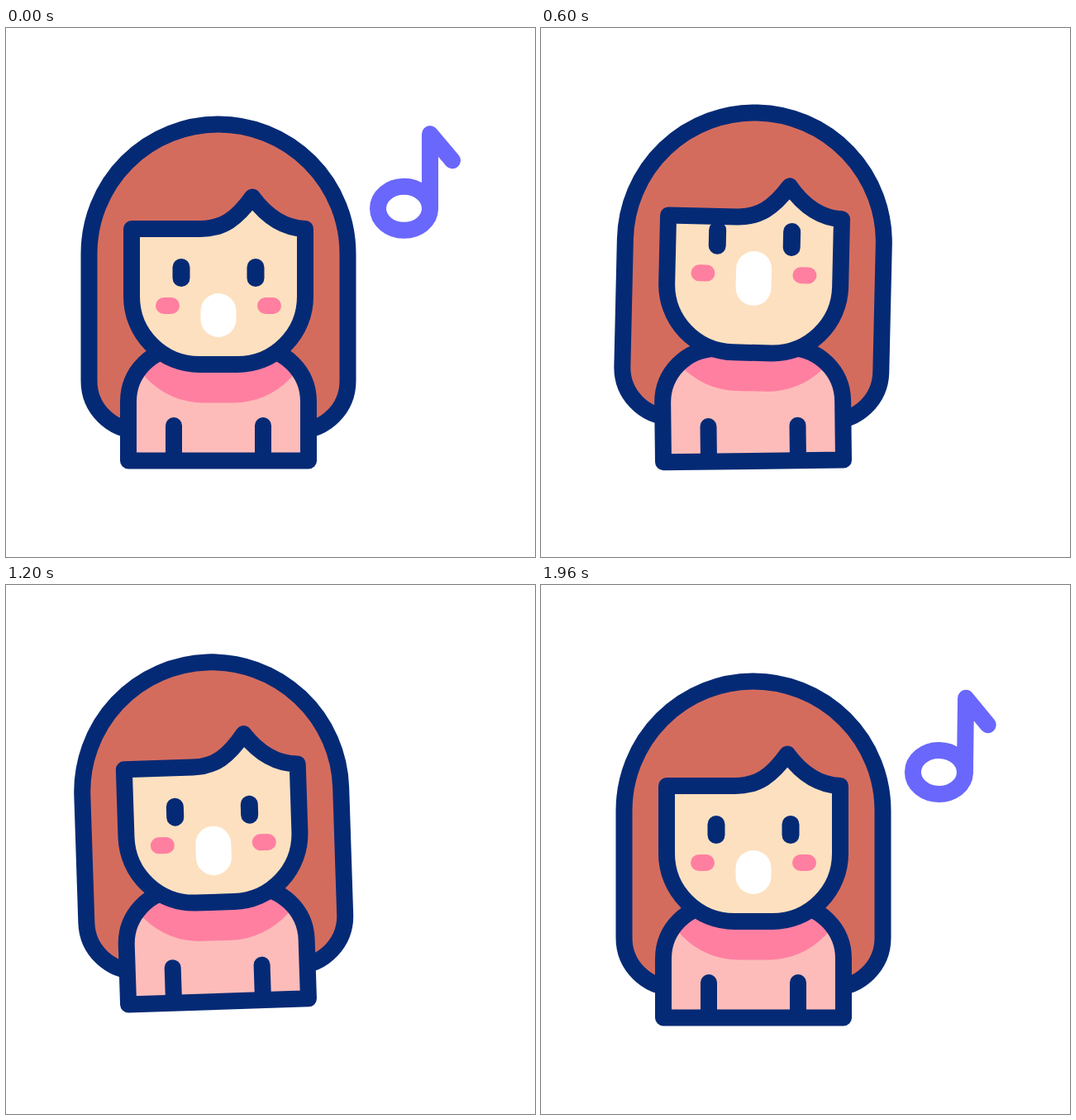
Recreate the animation shown at these times as an HTML page. Size 640 by 640 pixels, loop 2000 ms.

```html
<!DOCTYPE html>
<html lang="en">
<head>
<meta charset="utf-8">
<title>Singing girl</title>
<style>
  html, body { margin: 0; width: 100%; height: 100%; overflow: hidden; background: #fff; }
  svg { display: block; width: 100%; height: 100%; }
  .line { fill: none; stroke: #052a75; stroke-width: 20; stroke-linecap: round; stroke-linejoin: round; }
  .pink { fill: #ff7fa1; }
  .eye { fill: #052a75; }
</style>
</head>
<body>
<svg viewBox="0 0 640 640">
  <defs>
    <path id="torso" d="M148 523.5V452a65 65 0 0 1 65-65H301a65 65 0 0 1 65 65V523.5Z"/>
    <path id="face" d="M152 243H235C262 243 279 231 298 204.500C313 225 333 242 362 243V325a82 82 0 0 1-82 82H234a82 82 0 0 1-82-82Z"/>
    <clipPath id="inside"><use href="#torso"/></clipPath>
  </defs>
  <g id="body">
    <g class="head">
      <path class="line" style="fill:#d46c5e" d="M100.500 273a156.500 156.500 0 0 1 313 0V427a60 60 0 0 1-60 60H160.500a60 60 0 0 1-60-60Z"/>
    </g>
    <use href="#torso" fill="#fdbcb9"/>
    <g clip-path="url(#inside)">
      <g class="head">
        <path class="pink" d="M142 280H372V353.500a97 100 0 0 1-97 100H239a97 100 0 0 1-97-100Z"/>
      </g>
    </g>
    <path class="line" d="M203 481V523M311 481V523"/>
    <use href="#torso" class="line"/>
    <g class="head">
      <use href="#face" fill="#fde0bf"/>
      <g id="features">
        <rect class="eye" x="201.500" width="21" rx="10.500"/>
        <rect class="eye" x="291.500" width="21" rx="10.500"/>
        <rect class="pink" x="181" y="326" width="29" height="20" rx="10"/>
        <rect class="pink" x="304" y="326" width="29" height="20" rx="10"/>
        <rect id="mouth" x="235.500" width="43" rx="21.500" fill="#fff"/>
      </g>
      <use href="#face" class="line"/>
    </g>
  </g>
  <g id="note">
    <g class="line" style="stroke:#6a67fc">
      <ellipse cx="481.500" cy="218.500" rx="31.500" ry="26.500"/>
      <path d="M513 218V128.500L540 160.500"/>
    </g>
  </g>
</svg>
<script>
const $ = s => document.querySelector(s);
const all = s => document.querySelectorAll(s);
const heads = all('.head'), eyes = all('.eye');

// Sine-eased value at time t through [time, value] keys
function ease(t, keys) {
  if (t <= keys[0][0]) return keys[0][1];
  for (let i = 1; i < keys.length; i++) {
    const [t0, a] = keys[i - 1], [t1, b] = keys[i];
    if (t < t1) return a + (b - a) * (1 - Math.cos(Math.PI * (t - t0) / (t1 - t0))) / 2;
  }
  return keys[keys.length - 1][1];
}

// Shared swing: up, down, smaller up, rest; delay makes parts follow through
const swing = (t, delay, a, b, c) =>
  ease(t - delay, [[0, 0], [400, a], [800, b], [1290, c], [1680, 0]]);

function place(el, x, y, angle, px, py) {
  el.setAttribute('transform', `translate(${x} ${y}) rotate(${angle} ${px} ${py})`);
}

function stretch(el, bottom, height) {
  el.setAttribute('y', bottom - height);
  el.setAttribute('height', height);
}

function draw(t) {
  place($('#body'), 0, swing(t, 0, -50.7, 50.7, -25.7), swing(t, 0, -3.5, 2.1, -2.2), 257, 523);
  const headY = swing(t, 80, -25, 25, -14), headTurn = swing(t, 80, 4.5, -7.5, 2.7);
  heads.forEach(h => place(h, 0, headY, headTurn, 257, 402));

  place($('#features'), 0, swing(t, 160, -25, 13, -13), 0, 0, 0);
  const eye = ease(t, [[0, 0], [400, 12], [800, 0], [1200, 0], [1480, 12], [1840, 0]]);
  eyes.forEach(e => stretch(e, 313, 34 + eye));
  const open = ease(t, [[0, 0], [480, 14.5], [1000, 2], [1480, 14], [1840, 0]]);
  stretch($('#mouth'), 374, 53 + open);

  // The note's flight spans the loop point
  const u = t < 1000 ? t : t - 2000, note = $('#note');
  note.style.display = u > -601 && u < 580 ? '' : 'none';
  if (u < 0) place(note, -0.0077 * u, -0.2085 * u, -0.0183 * u, 495, 187);
  else place(note, 0, -0.182 * u, -0.0305 * u, 495, 187);
}

const start = performance.now();
function tick() {
  draw((performance.now() - start) % 2000);
  requestAnimationFrame(tick);
}
tick();
</script>
</body>
</html>
```
